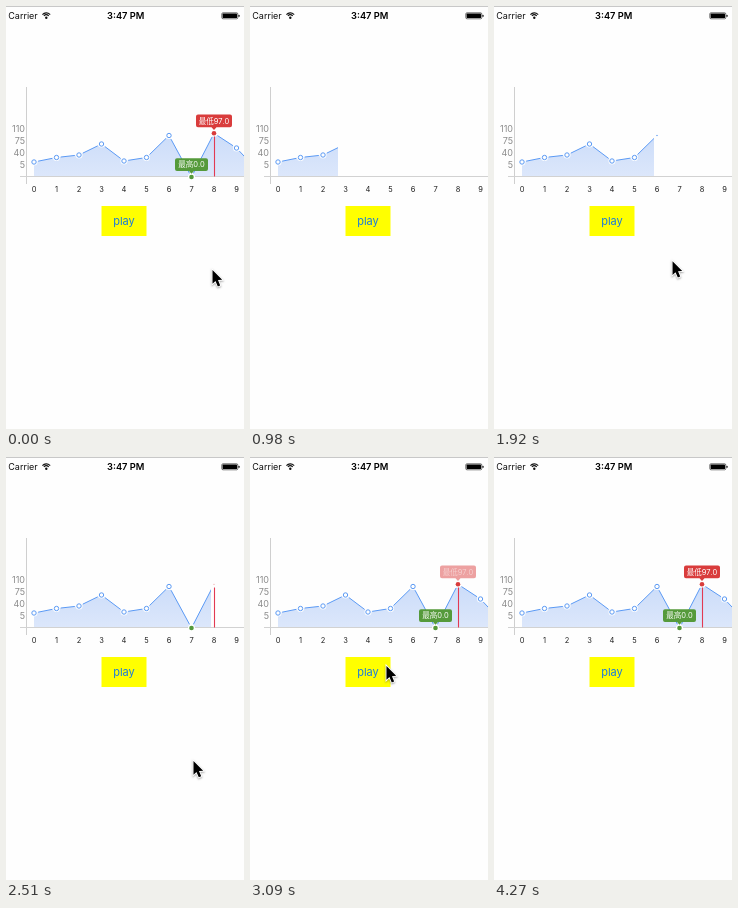
An HTML page with a canvas for the animation above (4580 ms loop, 238 by 423 pixels).

```html
<!DOCTYPE html>
<html lang="en">
<head>
<meta charset="utf-8">
<style>
html, body { margin: 0; width: 100%; height: 100%; overflow: hidden; background: #fefefe; }
canvas { display: block; width: 238px; height: 423px; }
</style>
</head>
<body>
<canvas id="stage"></canvas>
<script>
const W = 238, H = 423, LOOP = 4580, BASE = 170.5;
const BLUE = '#5b9af5', RED = '#d93c3c', GREEN = '#559a3b';
const canvas = document.getElementById('stage');
const ratio = window.devicePixelRatio || 1;
canvas.width = W * ratio;
canvas.height = H * ratio;
const c = canvas.getContext('2d');
c.scale(ratio, ratio);

const points = [156, 151.5, 149, 138, 155, 151.5, 129.5, 171, 127.3, 142, 166]
  .map((y, i) => ({ x: 28 + 22.5 * i, y }));

// time, x, y of the pointer tip
const path = [
  [60, 206.5, 264], [470, 198, 419], [580, 198, 420], [640, 198, 428],
  [1190, 206, 428], [1390, 226.5, 334], [1680, 180, 261], [1920, 178.5, 255],
  [2200, 187.5, 304], [2510, 187.5, 304], [2800, 184, 292], [3090, 136.5, 209],
  [3320, 126.5, 217], [3600, 126.5, 217], [4090, 176, 405], [4250, 177, 427]
];

const clamp = v => Math.max(0, Math.min(1, v));
const mix = (a, b, k) => a + (b - a) * k;

function text(s, x, y, size, color, align = 'center', weight = 400) {
  c.font = `${weight} ${size}px Inter, "Noto Sans CJK SC", "Noto Sans CJK", sans-serif`;
  c.fillStyle = color;
  c.textAlign = align;
  c.fillText(s, x, y);
}

function line(x1, y1, x2, y2, color, width = 1) {
  c.strokeStyle = color;
  c.lineWidth = width;
  c.beginPath();
  c.moveTo(x1, y1);
  c.lineTo(x2, y2);
  c.stroke();
}

function disc(x, y, r, color) {
  c.fillStyle = color;
  c.beginPath();
  c.arc(x, y, r, 0, 7);
  c.fill();
}

function box(x, y, w, h, r, color) {
  c.fillStyle = color;
  c.beginPath();
  c.roundRect(x, y, w, h, r);
  c.fill();
}

function polygon(list) {
  c.beginPath();
  list.forEach(p => c.lineTo(...p));
  c.closePath();
}

function statusBar() {
  box(0, 0, W, 1, 0, '#c8c8c8');
  text('Carrier', 2.3, 13, 9, '#111', 'left');
  text('3:47 PM', 119.7, 13, 9.3, '#000', 'center', 600);
  c.strokeStyle = '#111';
  c.lineWidth = 1.2;
  for (const r of [5.3, 3.3]) {
    c.beginPath();
    c.arc(40.3, 12.2, r, -Math.PI * 0.76, -Math.PI * 0.24);
    c.stroke();
  }
  disc(40.3, 11.7, 1.2, '#111');
  c.lineWidth = 0.6;
  c.beginPath();
  c.roundRect(215.8, 6.8, 16, 6, 1.2);
  c.stroke();
  box(216.6, 7.6, 14.4, 4.4, 0.6, '#000');
  box(232.5, 8.7, 1, 2.2, 0.5, '#111');
}

function axes() {
  line(20.5, 81, 20.5, 178, '#cfcfcf');
  line(14, BASE, W, BASE, '#d2d2d2');
  [110, 75, 40, 5].forEach((v, i) => text(v, 19, 126.3 + 12 * i, 9, '#8a8a8a', 'right'));
  for (let i = 0; i < 10; i++) text(i, points[i].x, 186.2, 7.5, '#222');
}

function area(u) {
  c.save();
  c.beginPath();
  c.rect(0, 80, 28 + 22.5 * u, 100);
  c.clip();
  const shade = c.createLinearGradient(0, 127, 0, BASE);
  shade.addColorStop(0, '#cbdcf9');
  shade.addColorStop(1, '#dce7fb');
  c.fillStyle = shade;
  polygon([[28, BASE], ...points.map(p => [p.x, Math.min(p.y, BASE)]), [253, BASE]]);
  c.fill();
  for (let i = 0; i < 10; i++) {
    const a = points[i], b = points[i + 1];
    const k = 4.2 / Math.hypot(b.x - a.x, b.y - a.y);
    line(mix(a.x, b.x, k), mix(a.y, b.y, k), mix(b.x, a.x, k), mix(b.y, a.y, k), BLUE);
  }
  c.restore();
}

function markers(u) {
  for (let i = 0; i < 10; i++) {
    const grow = clamp((u - i + 0.16) / 0.2);
    if (!grow) continue;
    const { x, y } = points[i];
    const s = 1.25 * grow - 0.25 * clamp((u - i - 0.08) / 0.2);
    disc(x, y, 3.5 * s, '#fefefe');
    if (i === 7 || i === 8) {
      if (i === 8) line(208.5, 130.5, 208.5, BASE, '#e23a52', 1.1);
      disc(x, y, 2.3 * s, i === 7 ? GREEN : RED);
    } else {
      c.strokeStyle = BLUE;
      c.lineWidth = 1;
      c.beginPath();
      c.arc(x, y, 2.2 * s, 0, 7);
      c.stroke();
    }
  }
}

function tip(label, x, y, w, color, alpha) {
  if (!alpha) return;
  // one layer, so that overlapping parts fade evenly
  c.globalAlpha = alpha;
  c.fillStyle = color;
  c.beginPath();
  c.roundRect(x - w / 2, y, w, 12.8, 2);
  c.moveTo(x - 2.5, y + 12.8);
  c.lineTo(x + 2.5, y + 12.8);
  c.lineTo(x, y + 15.5);
  c.fill();
  text(label, x, y + 9.1, 7.5, '#fff');
  c.globalAlpha = 1;
}

function pointer(t) {
  let i = 0;
  while (i < path.length - 2 && t > path[i + 1][0]) i++;
  const [t0, x0, y0] = path[i], [t1, x1, y1] = path[i + 1];
  const k = clamp((t - t0) / (t1 - t0));
  c.save();
  c.translate(mix(x0, x1, k), mix(y0, y1, k));
  polygon([[0, 0], [0, 13.8], [3, 11], [5.3, 16.4], [7.7, 15.4], [5.5, 10.1], [9.7, 9.8]]);
  c.shadowColor = 'rgba(0,0,0,.35)';
  c.shadowBlur = 2 * ratio;
  c.shadowOffsetY = ratio;
  c.strokeStyle = '#fff';
  c.lineWidth = 1.8;
  c.stroke();
  c.shadowColor = 'transparent';
  c.fillStyle = '#000';
  c.fill();
  c.restore();
}

function draw(t) {
  const u = t < 120 ? 11 : (t - 197) / 294;
  const fade = start => t < 120 ? 1 : clamp((t - start) / 400);
  box(0, 0, W, H, 0, '#fefefe');
  statusBar();
  if (u > 0) area(u);
  axes();
  markers(u);
  tip('最高0.0', 185.5, 152.2, 33, GREEN, fade(2590));
  tip('最低97.0', 208, 108.4, 36, RED, fade(2900));
  box(95.5, 200, 45, 30, 0, '#ff0');
  text('play', 118, 219, 11, '#1b7cdc');
  pointer(t);
}

const begin = performance.now();
function tick() {
  draw((performance.now() - begin) % LOOP);
  requestAnimationFrame(tick);
}
tick();
</script>
</body>
</html>
```
